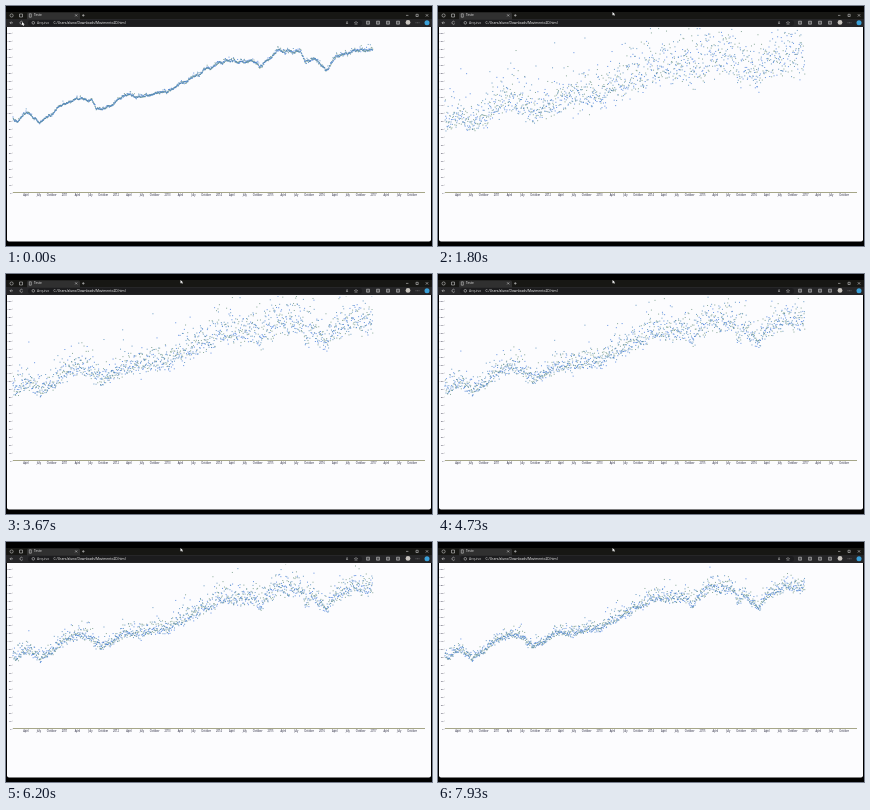
These frames come from a looping animation (426 by 240 pixels, 8000 ms). An HTML page with a canvas:

```html
<!DOCTYPE html>
<html lang="pt">
<head>
<meta charset="utf-8">
<style>
html, body { margin: 0; width: 100%; height: 100%; overflow: hidden; background: #000; }
canvas { display: block; width: 100vw; height: 100vh; }
</style>
</head>
<body>
<canvas id="stage" width="426" height="240"></canvas>
<script>
const ctx = document.getElementById("stage").getContext("2d");
const LOOP = 8000, STEP = 1000 / 15, RELOAD = 60;
const LEFT = 7, RIGHT = 367, BASE = 187, COUNT = 1500;

// Main turning points of the price curve; small swings come from a random walk
const turns = [
  [7, 111], [12, 116], [22, 107], [34, 115], [60, 97], [74, 92], [86, 95], [90, 105],
  [106, 99], [122, 87], [130, 92], [161, 85], [190, 69], [213, 56], [247, 54], [254, 61],
  [272, 44], [294, 45], [300, 56], [308, 51], [320, 66], [330, 51], [350, 44], [367, 43]
];

function curveY(x) {
  const i = Math.max(1, turns.findIndex(turn => turn[0] >= x));
  const [x0, y0] = turns[i - 1], [x1, y1] = turns[i];
  return y0 + (y1 - y0) * (x - x0) / (x1 - x0);
}

let seed = 20107;
function random() {
  seed = (seed * 1664525 + 1013904223) % 4294967296;
  return (seed + 0.5) / 4294967296;
}
const gauss = () => Math.sqrt(-2 * Math.log(random())) * Math.cos(2 * Math.PI * random());

const colors = ["#3f78dc", "#4b88b8", "#6c9480"];
let swing = 0;
const points = Array.from({ length: COUNT }, (_, i) => {
  const x = LEFT + (RIGHT - LEFT) * i / COUNT;
  swing = 0.93 * swing + 0.35 * gauss();
  return { x, height: BASE - curveY(x) - swing, a: gauss(), b: gauss(), color: colors[i % 3] };
});

function rect(color, x, y, w, h, r = 0) {
  ctx.fillStyle = color;
  ctx.beginPath();
  ctx.roundRect(x, y, w, h, r);
  ctx.fill();
}

function disc(color, x, y, r) {
  ctx.fillStyle = color;
  ctx.beginPath();
  ctx.arc(x, y, r, 0, 2 * Math.PI);
  ctx.fill();
}

function line(color, path, width = 0.6) {
  ctx.strokeStyle = color;
  ctx.lineWidth = width;
  ctx.stroke(new Path2D(path));
}

function text(string, x, y, size, color, align = "left") {
  ctx.font = `${size}px "Open Sans", sans-serif`;
  ctx.textAlign = align;
  ctx.textBaseline = "middle";
  ctx.fillStyle = color;
  ctx.fillText(string, x, y);
}

function drawBrowser() {
  const icon = "#c4c4c4";
  rect("#000", 0, 0, 426, 240);
  rect("#171714", 0, 6, 426, 7);
  rect("#262628", 0, 13, 426, 8);
  rect("#303030", 21, 6.5, 53, 7, [1.5, 1.5, 0, 0]);
  rect("#1c1c1e", 22, 14, 334, 6, 3);

  line(icon, "M4 9.5a1.6 1.6 0 1 0 3.2 0a1.6 1.6 0 1 0-3.2 0M13.5 8h3v3h-3z");
  line(icon, "M23.3 7.8h2v3.4h-2zM69.2 8.4l2 2m0-2l-2 2M76 9.4h2.6m-1.3-1.3v2.6");
  text("Teste", 28, 9.5, 3.2, "#eee");
  line(icon, "M400 9.4h2.4M410 8.3h2.2v2.2h-2.2zM419.8 8.2l2.4 2.4m0-2.4l-2.4 2.4");

  line(icon, "M7 16.8H4m1.3-1.3L4 16.8l1.3 1.3M16.7 16a1.5 1.5 0 1 0 .1 1.5M26 16.8a1.3 1.3 0 1 0 2.6 0a1.3 1.3 0 1 0-2.6 0");
  text("Arquivo", 31, 16.7, 3.4, "#ccc");
  text("C:/Users/aluno/Downloads/Movimento2D.html", 47.5, 16.7, 3.3, "#fff");

  text("A", 341, 16.7, 3.4, icon, "center");
  line(icon, "M350 15.3l.5 1.1 1.2.1-.9.8.3 1.2-1.1-.7-1.1.7.3-1.2-.9-.8 1.2-.1z", 0.4);
  for (const x of [362, 372, 382, 392]) line(icon, `M${x - 1.5} 15.2h3v3h-3zM${x} 15.2v3`);
  disc("#c8c4be", 402, 16.4, 2.4);
  for (const x of [410, 411.5, 413]) disc(icon, x, 16.8, 0.4);
  disc("#3aa0d8", 421, 16.7, 2.5);

  rect("#fcfcfe", 1, 21, 424, 214.5, [0, 0, 2, 2]);
}

function drawAxes() {
  const ink = "#1c1c34";
  for (let i = 0; i <= 20; i++) {
    const y = BASE - 8 * i;
    text(String(i * 10), 5.5, y, 2.5, ink, "right");
    line("#888", `M6 ${y}h1`, 0.3);
  }
  line("#a6a688", `M${LEFT} 186.5H419`, 1);
  for (let k = 0; k <= 30; k++) {
    const x = 20 + 12.87 * k, quarter = (k + 1) % 4;
    const label = quarter ? ["April", "July", "October"][quarter - 1] : String(2011 + (k - 3) / 4);
    line("#777", `M${x} 187v1`, 0.3);
    text(label, x, 189.4, 2.6, ink, "center");
  }
}

// Longer tail upwards than downwards
const skew = g => (Math.exp(0.4 * g) - 1.08) / 0.45;

// Every point wanders slowly while the spread shrinks towards the curve
function drawPoints(time) {
  const spread = time < RELOAD ? 0.007 : 0.185 * Math.exp(-time / 4350);
  const angle = 0.9 * Math.log(1 + time / 400);
  const ca = Math.cos(angle), sa = Math.sin(angle);
  ctx.save();
  ctx.beginPath();
  ctx.rect(1, 22, 424, 213);
  ctx.clip();
  ctx.globalAlpha = 0.8;
  for (const p of points) {
    ctx.fillStyle = p.color;
    const y = BASE - p.height * (1 + spread * skew(p.a * ca + p.b * sa));
    ctx.fillRect(p.x - 0.5, y - 0.5, 1, 1);
  }
  ctx.restore();
}

function drawCursor(time) {
  const u = Math.min(1, Math.max(0, (time - RELOAD) / 740));
  const ease = u * u * (3 - 2 * u);
  ctx.save();
  ctx.translate(16 + 158.5 * ease, 16 - 10 * ease);
  ctx.fillStyle = "#fff";
  ctx.fill(new Path2D("M0 0v3.4l.9-.8.6 1.3.6-.3-.6-1.2h1.2z"));
  ctx.restore();
}

function frame(now) {
  const time = Math.floor((now % LOOP) / STEP + 1e-6) * STEP;
  drawBrowser();
  drawAxes();
  drawPoints(time);
  drawCursor(time);
  requestAnimationFrame(frame);
}
frame(0);
</script>
</body>
</html>
```
